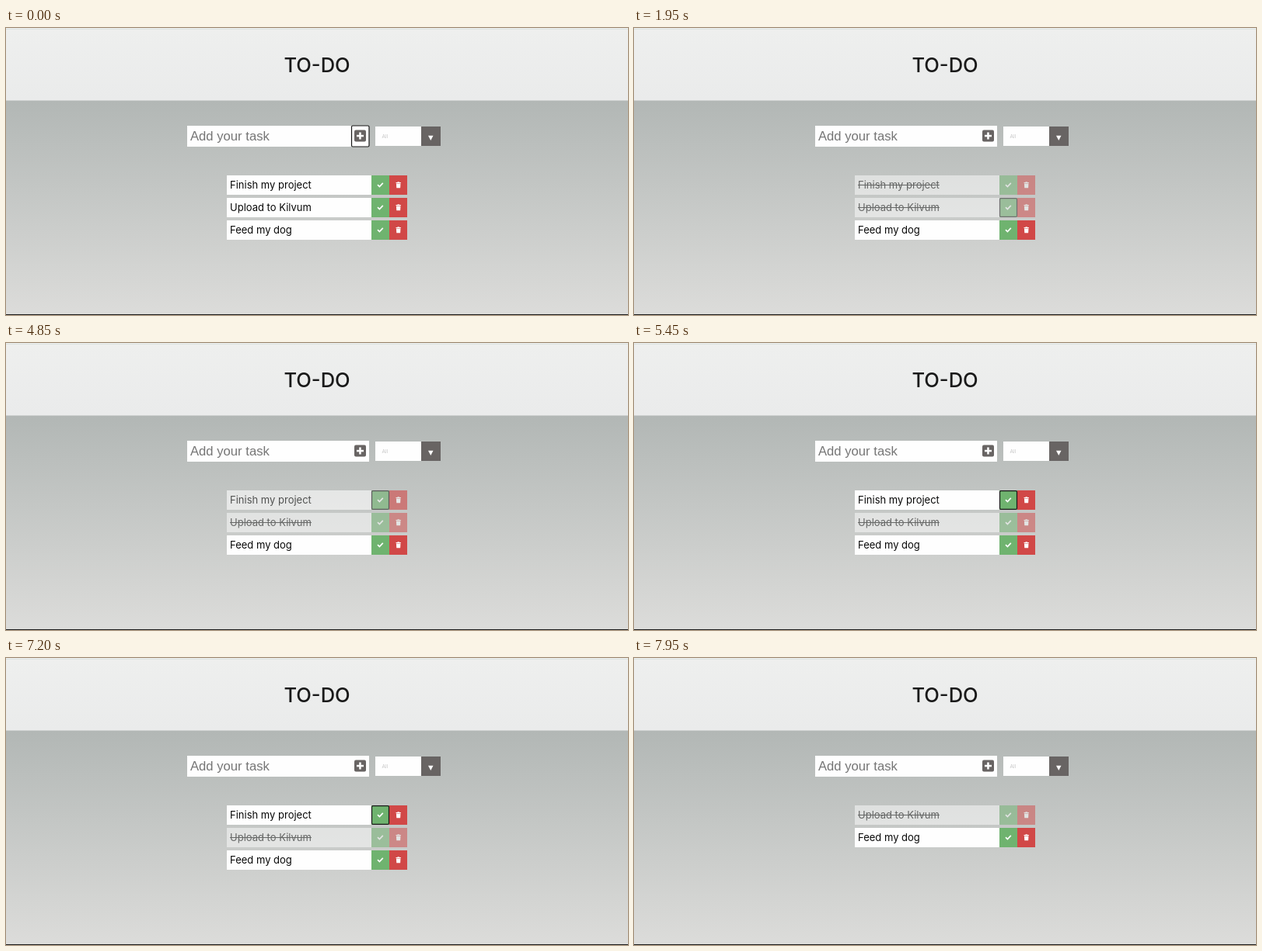
An HTML page with a canvas that plays this animation: 800 by 370 pixels, repeating every 8000 ms.

```html
<!DOCTYPE html>
<html lang="en">
<head>
<meta charset="utf-8">
<title>To-do</title>
<style>
  html, body { margin: 0; width: 100%; height: 100%; overflow: hidden; }
  canvas { display: block; }
</style>
</head>
<body>
<canvas id="stage" width="800" height="370"></canvas>
<script>
const W = 800, H = 370, LOOP = 8000, FADE = 500;
const LEFT = 284, TOP = 190, PITCH = 29, ROW_W = 232, ROW_H = 25;
const SANS = 'Inter, sans-serif';
const ARIAL = '"Liberation Sans", Arial, sans-serif';
const DARK = '#686463', PAPER = '#fefefe';

// User actions, in ms
const CHECK_1 = 80, CHECK_2 = 1180, UNCHECK_1 = 4770, REMOVE_1 = 7330;
const REMOVED = REMOVE_1 + FADE;

const tasks = [
  { label: 'Finish my project', done: [CHECK_1, UNCHECK_1] },
  { label: 'Upload to Kilvum', done: [CHECK_2, Infinity] },
  { label: 'Feed my dog', done: [Infinity, Infinity] }
];

const ctx = document.getElementById('stage').getContext('2d');
const layer = document.createElement('canvas');
layer.width = ROW_W;
layer.height = ROW_H;
const row = layer.getContext('2d');

const clamp = v => Math.min(1, Math.max(0, v));

// CSS "ease": cubic-bezier(.25, .1, .25, 1)
function ease(x) {
  const bez = (a, b, u) => 3 * a * u * (1 - u) ** 2 + 3 * b * u * u * (1 - u) + u ** 3;
  let lo = 0, hi = 1;
  for (let i = 0; i < 20; i++) {
    const mid = (lo + hi) / 2;
    if (bez(.25, .25, mid) < x) lo = mid; else hi = mid;
  }
  return bez(.1, 1, lo);
}
const progress = (t, start) => ease(clamp((t - start) / FADE));

function rect(c, x, y, w, h, fill) {
  c.fillStyle = fill;
  c.fillRect(x, y, w, h);
}

function text(c, str, x, y, font, fill, align = 'left') {
  c.font = font;
  c.fillStyle = fill;
  c.textAlign = align;
  c.fillText(str, x, y);
}

function poly(c, pts, fill) {
  c.fillStyle = fill;
  c.beginPath();
  pts.forEach(([x, y]) => c.lineTo(x, y));
  c.fill();
}

function ring(c, x, y, w, h) {
  c.strokeStyle = '#181818';
  c.lineWidth = 1.2;
  c.beginPath();
  c.roundRect(x, y, w, h, 1.5);
  c.stroke();
}

function shade(y0, y1, from, to) {
  const g = ctx.createLinearGradient(0, y0, 0, y1);
  g.addColorStop(0, from);
  g.addColorStop(1, to);
  rect(ctx, 0, y0, W, y1 - y0, g);
}

function drawPage(t) {
  shade(93, H, '#b2b7b5', '#dcdcda');
  shade(0, 93.5, '#eeefee', '#eaebeb');
  rect(ctx, 0, 1, W, 1, '#dce3e1');
  rect(ctx, 0, 369, W, 1, '#1c1c1c');
  text(ctx, 'TO-DO', 400, 57, `500 25.5px ${SANS}`, '#1a1a1a', 'center');

  rect(ctx, 233, 126, 234, 27, PAPER);
  text(ctx, 'Add your task', 237, 145, `16.67px ${ARIAL}`, '#757575');
  ctx.fillStyle = DARK;
  ctx.beginPath();
  ctx.roundRect(448, 131.5, 15, 15, 2);
  ctx.fill();
  rect(ctx, 451, 137.8, 9, 2.5, PAPER);
  rect(ctx, 454.2, 134.5, 2.5, 9, PAPER);
  if (t < CHECK_1) ring(ctx, 444.5, 126, 22.5, 27);

  rect(ctx, 475, 127, 59, 25, PAPER);
  rect(ctx, 534, 127, 25, 25, DARK);
  text(ctx, 'All', 483.5, 142, `6.6px ${SANS}`, '#c4c4c4');
  poly(ctx, [[543, 138.7], [549.5, 138.7], [546.25, 145]], PAPER);
}

function paintRow(label, done, focus) {
  rect(row, 0, 0, 186, ROW_H, PAPER);
  rect(row, 186, 0, 23, ROW_H, '#6fb36f');
  rect(row, 209, 0, 23, ROW_H, '#d14847');
  text(row, label, 4, 16.6, `13px ${SANS}`, '#080808');
  if (done) rect(row, 4, 12, row.measureText(label).width, 1, '#080808');

  row.strokeStyle = PAPER;
  row.lineWidth = 1.7;
  row.beginPath();
  row.moveTo(194, 12.2);
  row.lineTo(196.4, 14.5);
  row.lineTo(200.8, 9.9);
  row.stroke();

  rect(row, 217.5, 9, 6.4, 1, PAPER);
  rect(row, 219.4, 8.4, 2.6, 1, PAPER);
  poly(row, [[217.9, 10.4], [223.5, 10.4], [223.1, 16.2], [218.3, 16.2]], PAPER);

  if (focus === 'check') ring(row, 186.5, .6, 22, 23.8);
  if (focus === 'trash') ring(row, 209.5, .6, 21.9, 23.8);
}

function focusOf(i, t) {
  if (i === 0) {
    if (t >= REMOVE_1) return 'trash';
    if (t >= UNCHECK_1 || (t >= CHECK_1 && t < CHECK_2)) return 'check';
  }
  if (i === 1 && t >= CHECK_2 && t < UNCHECK_1) return 'check';
  return '';
}

function drawTask({ label, done: [on, off] }, i, t) {
  const gone = t >= REMOVED;
  if (i === 0 && gone) return;
  const fall = i === 0 ? progress(t, REMOVE_1) : 0;
  const faded = progress(t, on) - progress(t, off);
  const y = TOP + PITCH * (gone ? i - 1 : i);

  paintRow(label, t >= on && t < off, focusOf(i, t));
  ctx.save();
  ctx.globalAlpha = (1 - .5 * faded) * (1 - fall);
  ctx.translate(LEFT + ROW_W / 2, y + ROW_H / 2 + 89 * fall);
  ctx.rotate(fall * Math.PI / 9);
  ctx.drawImage(layer, -ROW_W / 2, -ROW_H / 2);
  ctx.restore();
}

function draw(t) {
  drawPage(t);
  // The falling first row is painted above its siblings
  for (let i = tasks.length - 1; i >= 0; i--) drawTask(tasks[i], i, t);
}

const start = performance.now();
function tick() {
  draw((performance.now() - start) % LOOP);
  requestAnimationFrame(tick);
}
tick();
</script>
</body>
</html>
```
